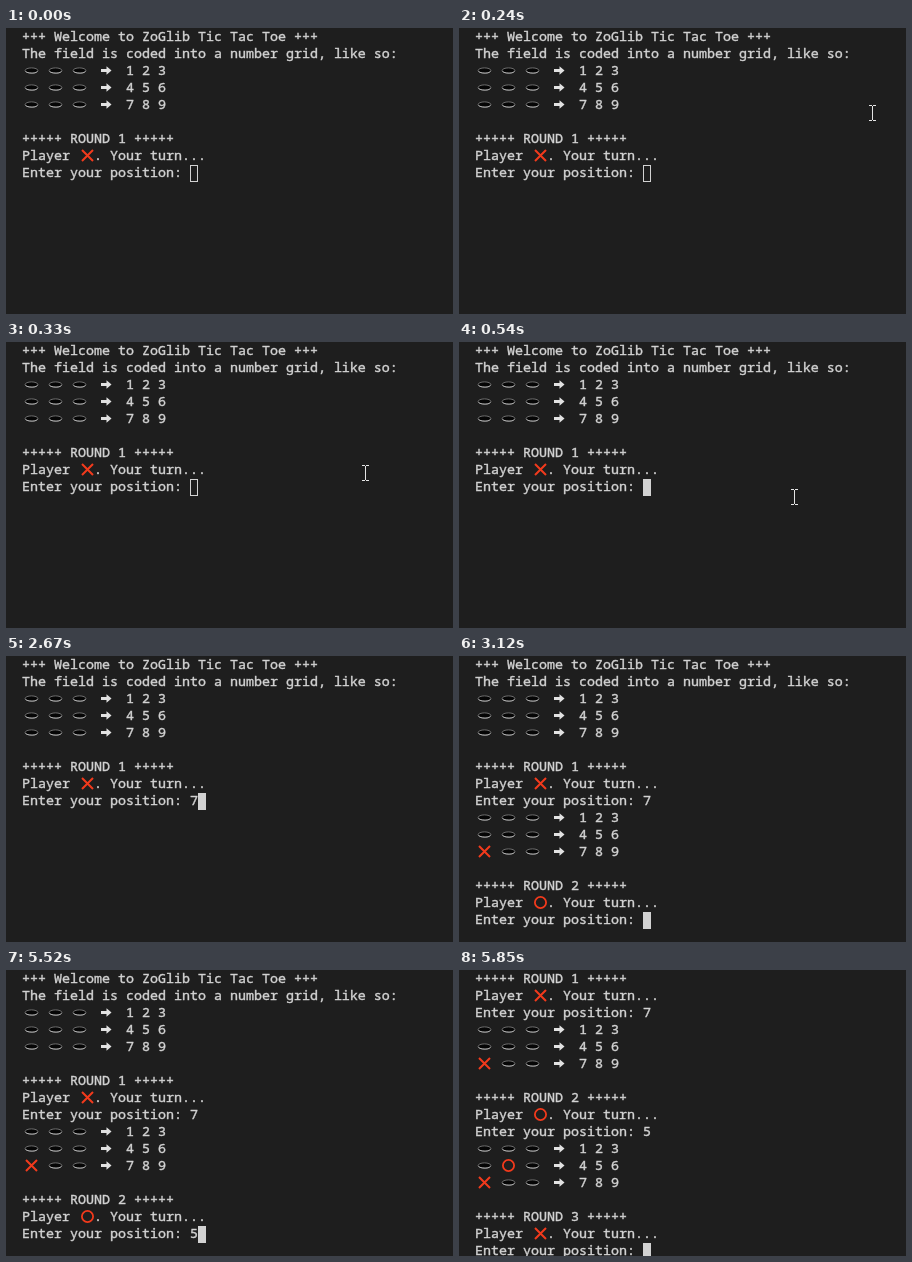
Write an HTML page with a canvas that moves like this. It is 447 px wide and 286 px high and loops after 8 s.

```html
<!DOCTYPE html>
<html lang="en">
<head>
<meta charset="utf-8">
<title>Terminal game</title>
<style>
  html, body { margin: 0; width: 100%; height: 100%; overflow: hidden; background: #1e1e1e; }
  canvas { display: block; }
</style>
</head>
<body>
<canvas id="stage" width="447" height="286"></canvas>
<script>
const ctx = document.getElementById('stage').getContext('2d');
const LOOP = 8000, LEFT = 16, CELL = 8, ROW = 17;
const BG = '#1e1e1e', INK = '#d2d2d2', RED = '#f23a1c';

// Each of • × ○ → is an emoji two cells wide.
const grid = (a, b, c) => [`${a} →  1 2 3`, `${b} →  4 5 6`, `${c} →  7 8 9`, ''];
const turn = (n, mark) => [`+++++ ROUND ${n} +++++`, `Player ${mark}. Your turn...`, 'Enter your position: '];
const EMPTY = '• • •';
const intro = ['+++ Welcome to ZoGlib Tic Tac Toe +++',
  'The field is coded into a number grid, like so:',
  ...grid(EMPTY, EMPTY, EMPTY), ...turn(1, '×')];
const type = (lines, key) => [...lines.slice(0, -1), lines.at(-1) + key];
const typed1 = type(intro, '7');
const round2 = [...typed1, ...grid(EMPTY, EMPTY, '× • •'), ...turn(2, '○')];
const typed2 = type(round2, '5');
const round3 = [...typed2, ...grid(EMPTY, '• ○ •', '× • •'), ...turn(3, '×')];
const screens = [[5850, round3], [5520, typed2], [3120, round2], [2670, typed1], [0, intro]];

function stroke(color, width, trace) {
  ctx.strokeStyle = color;
  ctx.lineWidth = width;
  ctx.beginPath();
  trace();
  ctx.stroke();
}

const emoji = {
  '•'(x, y) {
    ctx.fillStyle = '#050505';
    ctx.beginPath();
    ctx.ellipse(x, y, 6.4, 2.6, 0, 0, 7);
    ctx.fill();
    stroke('#777', 0.9, () => ctx.ellipse(x, y, 6.4, 2.6, 0, 0, 7));
    stroke('#c4c4c4', 0.8, () => ctx.ellipse(x, y, 6.4, 2.6, 0, 0.3, Math.PI - 0.3));
  },
  '×'(x, y) {
    stroke(RED, 2, () => {
      for (const s of [-1, 1]) {
        ctx.moveTo(x - 5.5, y - 5.5 * s);
        ctx.lineTo(x + 5.5, y + 5.5 * s);
      }
    });
  },
  '○'(x, y) {
    stroke(RED, 1.8, () => ctx.arc(x, y, 5.6, 0, 7));
  },
  '→'(x, y) {
    ctx.fillStyle = '#e2e2e2';
    ctx.fillRect(x - 2.5, y - 1.5, 6, 3);
    ctx.beginPath();
    ctx.moveTo(x + 3, y - 4.2);
    ctx.lineTo(x + 8, y);
    ctx.lineTo(x + 3, y + 4.2);
    ctx.fill();
  }
};

function drawLine(line, row) {
  const cells = line.replace(/[•×○→]/g, '$& ');
  const text = cells.replace(/[•×○→]/g, ' ');
  const base = 13 + row * ROW;
  ctx.fillStyle = ctx.strokeStyle = INK;
  ctx.lineWidth = 0.4;
  ctx.fillText(text, LEFT, base);
  ctx.strokeText(text, LEFT, base);
  [...cells].forEach((c, i) => emoji[c]?.(LEFT + i * CELL + 9.5, 8.5 + row * ROW));
}

function drawCaret(line, row, focused) {
  const x = LEFT + line.length * CELL, y = 1 + row * ROW;
  ctx.fillStyle = INK;
  ctx.fillRect(x, y, CELL, ROW);
  if (!focused) {
    ctx.fillStyle = BG;
    ctx.fillRect(x + 1, y + 1, CELL - 2, ROW - 2);
  }
}

function pointerAt(t) {
  if (t < 210 || t >= 1050) return null;
  if (t < 990) {
    const left = 1 - Math.min(1, (t - 210) / 210);
    return [335 + 101 * left ** 1.69, 155 - 88 * left ** 1.53];
  }
  const away = ((t - 960) / 60) ** 1.5;
  return [335 + 71 * away, 155 + 30 * away];
}

function drawPointer([px, py]) {
  const x = Math.round(px), y = Math.round(py);
  ctx.fillStyle = '#e4e4e4';
  ctx.fillRect(x, y - 7, 1, 14);
  for (const edge of [y - 8, y + 7]) {
    ctx.fillRect(x - 3, edge, 3, 1);
    ctx.fillRect(x + 1, edge, 3, 1);
  }
}

function draw(now) {
  const t = now % LOOP;
  const lines = screens.find(([start]) => t >= start)[1];
  const visible = lines.slice(Math.max(0, lines.length - 17));
  ctx.fillStyle = BG;
  ctx.fillRect(0, 0, 447, 286);
  ctx.font = '500 13.333px "Noto Sans Mono", "DejaVu Sans Mono", monospace';
  visible.forEach(drawLine);
  drawCaret(visible.at(-1), visible.length - 1, t >= 540);
  const pointer = pointerAt(Math.floor(t / 30) * 30);
  if (pointer) drawPointer(pointer);
}

const start = performance.now();
function tick() {
  draw(performance.now() - start);
  requestAnimationFrame(tick);
}
tick();
</script>
</body>
</html>
```
